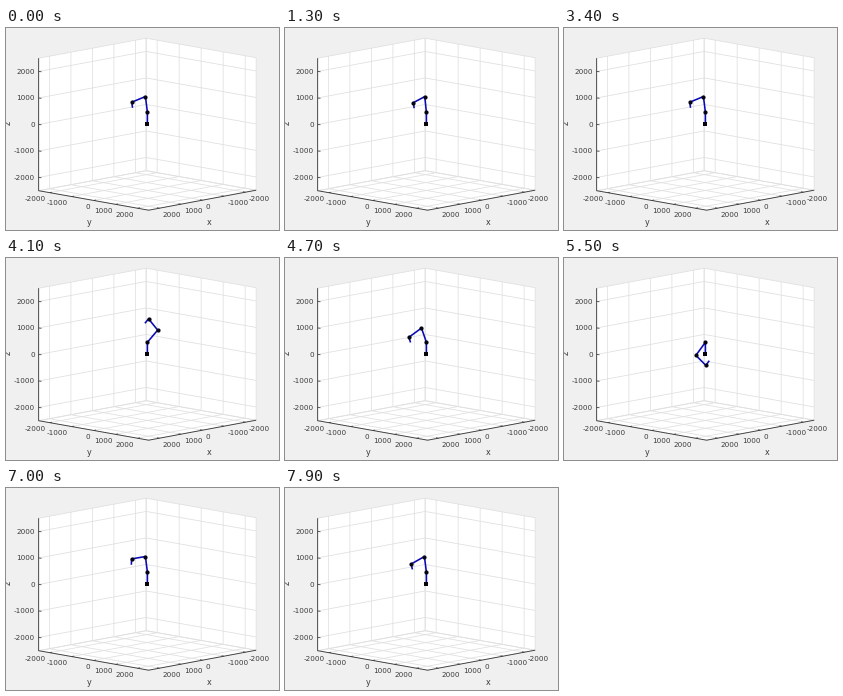
Write a matplotlib script that moves like this. It is 273 px wide and 202 px high and loops after 8000 ms.

```python
import numpy as np
import matplotlib.pyplot as plt
from matplotlib.animation import FuncAnimation

W, H, DPI = 273, 202, 100
LIM = 2500
TICKS = range(-2000, 2001, 1000)
PT = 72 / DPI  # points per pixel
GRID, INK = "#e0e0e0", "#3c3c3c"

fig = plt.figure(figsize=(W / DPI, H / DPI), dpi=DPI, facecolor="#f0f0f0")
ax = fig.add_axes([0, 0, 1, 1])
ax.set(xlim=(0, W), ylim=(H, 0))
ax.axis("off")


def project(x, y, z):
    """Map world millimetres to stage pixels."""
    return (141.4 + 0.022 * y - 0.0215 * x,
            96.2 + 0.0039 * y + 0.0040 * x - 0.0265 * z)


def line(points, color, width):
    px, py = zip(*(project(*p) for p in points))
    ax.plot(px, py, color=color, lw=width * PT, solid_capstyle="butt")


def label(x, y, text, ha="center", size=7.3, **kw):
    ax.text(x, y, text, ha=ha, va="center_baseline", color=INK,
            fontsize=size * PT, family="DejaVu Sans", **kw)


def draw_box():
    lo, hi = -LIM, LIM
    outline = [(hi, lo, hi), (lo, lo, hi), (lo, hi, hi),
               (lo, hi, lo), (hi, hi, lo), (hi, lo, lo)]
    ax.fill(*zip(*(project(*p) for p in outline)), color="white", lw=0)

    for v in (lo, *TICKS, hi):
        line([(v, hi, lo), (v, lo, lo), (v, lo, hi)], GRID, 0.8)
        line([(hi, v, lo), (lo, v, lo), (lo, v, hi)], GRID, 0.8)
        line([(hi, lo, v), (lo, lo, v), (lo, hi, v)], GRID, 0.8)
    line([(hi, lo, hi), (hi, lo, lo), (hi, hi, lo), (lo, hi, lo)], INK, 0.9)

    for v in TICKS:
        line([(v, hi, lo), (v, hi - 110, lo)], INK, 0.8)
        line([(hi, v, lo), (hi - 110, v, lo)], INK, 0.8)
        line([(hi, lo, v), (hi - 20, lo + 110, v)], INK, 0.8)
        px, py = project(v, hi, lo)
        label(px + 3.5, py + 6, str(v), "left")
        px, py = project(hi, v, lo)
        label(px - 3.5, py + 6, str(v), "right")
        px, py = project(hi, lo, v)
        label(px - 4, py, str(v), "right")

    label(83, 193.5, "y", size=8)
    label(203, 193.5, "x", size=8)
    label(2, 96, "z", size=8, rotation=90)


def ease(t, keys):
    """Move through (time, value) keys with smooth starts and stops."""
    times, values = zip(*keys)
    i = int(np.clip(np.searchsorted(times, t, side="right") - 1, 0, len(keys) - 2))
    u = np.clip((t - times[i]) / (times[i + 1] - times[i]), 0, 1)
    u = u * u * (3 - 2 * u)
    return values[i] + (values[i + 1] - values[i]) * u


# Joint swings, one joint after another: (ms, degrees)
TURN = [(200, 0), (800, -62), (1300, 9), (2050, 120), (2600, 86), (3400, 0)]
SHOULDER = [(3400, 8.5), (4100, -51), (5500, 134), (6300, -18), (6800, 8.5)]
ELBOW = [(6800, 92), (7350, 55), (7900, 98.5)]
WRIST = 88
LINKS = (615, 645, 190)

# Moments at which the pose is refreshed: (first, last, count)
BURSTS = [(300, 1300, 7), (1500, 2500, 8), (2600, 3500, 7), (3700, 4700, 8),
          (4900, 5800, 7), (6000, 7000, 7), (7200, 7900, 5)]
STEPS = np.concatenate([[0]] + [
    np.floor(np.linspace(a, b, n) / 100 + 0.5) * 100 for a, b, n in BURSTS])


def pose(t):
    """Pixel positions of base, shoulder, elbow, wrist and tip."""
    turn = np.radians(ease(t, TURN))
    bends = np.radians(np.cumsum([ease(t, SHOULDER), ease(t, ELBOW), WRIST]))
    r, z = 0, 450
    chain = [(0, 0), (r, z)]
    for length, a in zip(LINKS, bends):
        r += length * np.sin(a)
        z += length * np.cos(a)
        chain.append((r, z))
    return np.array([project(r * np.cos(turn), r * np.sin(turn), z)
                     for r, z in chain])


draw_box()
arm, = ax.plot([], [], color="#0a0ab4", lw=1.6 * PT, solid_joinstyle="round", zorder=5)
joints, = ax.plot([], [], "o", color="#050514", ms=4.2 * PT, mew=0, zorder=6)
base, = ax.plot([], [], "s", color="#08040c", ms=4.2 * PT, mew=0, zorder=6)


def update(i):
    t = STEPS[np.searchsorted(STEPS, i * 100, side="right") - 1]
    p = pose(t)
    arm.set_data(p[:, 0], p[:, 1])
    joints.set_data(p[1:4, 0], p[1:4, 1])
    base.set_data(p[:1, 0], p[:1, 1])
    return arm, joints, base


anim = FuncAnimation(fig, update, frames=80, interval=100, repeat=True,
                     repeat_delay=0, blit=False)
plt.show()
```
